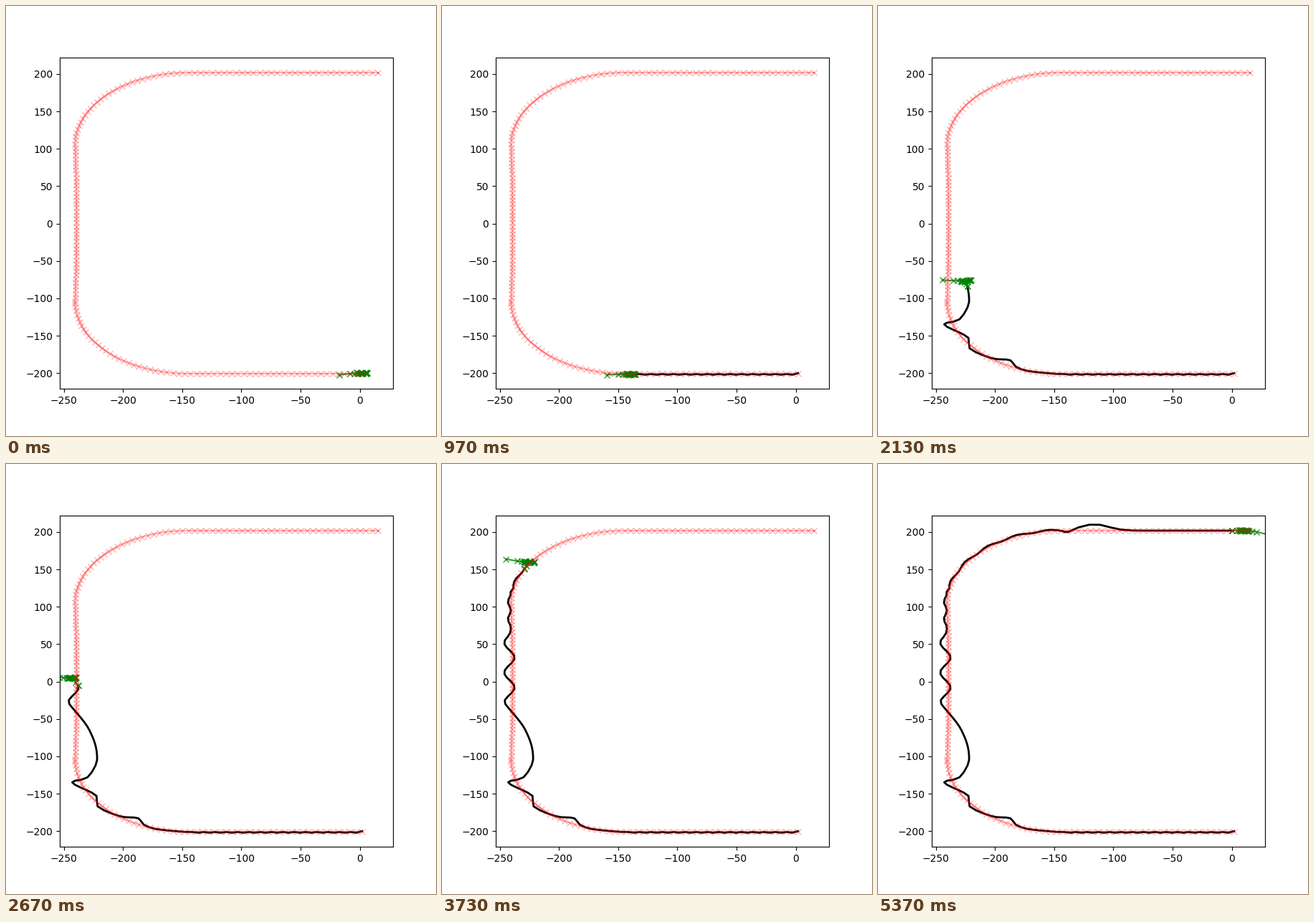
Animation, 600 px wide and 600 px high, one loop 5.41 s. Source, as a matplotlib script:

```python
import numpy as np
import matplotlib.pyplot as plt
from matplotlib.animation import FuncAnimation

FRAMES, LOOP_MS = 163, 5410
LAST = 161                      # final driving step, held to the end
CX, CY, RX, RY = -145, 105.5, 95.6, 96.3
LOW, HIGH = -200.8, 201.8


def course(step=5):
    """C-shaped course, resampled at even distances."""
    t = np.linspace(0, 1, 400)
    side = CY * (2 * t - 1)
    quarter = t * np.pi / 2
    x = np.concatenate([2 + (CX - 2) * t, CX - RX * np.sin(quarter),
                        -239.4 - 1.2 * (side / CY) ** 2,
                        CX - RX * np.cos(quarter), CX + (15.35 - CX) * t])
    y = np.concatenate([np.full(400, LOW), -CY - RY * np.cos(quarter) + 1,
                        side, CY + RY * np.sin(quarter), np.full(400, HIGH)])
    dist = np.append(0, np.cumsum(np.hypot(np.diff(x), np.diff(y))))
    even = np.linspace(0, dist[-1], round(dist[-1] / step) + 1)
    return np.interp(even, dist, x), np.interp(even, dist, y)


def smooth(t, keys):
    """Hermite curve through (time, x, y) keys."""
    k = np.array(keys, float)
    time, pos = k[:, 0], k[:, 1:]
    slope = np.empty_like(pos)
    slope[1:-1] = (pos[2:] - pos[:-2]) / (time[2:] - time[:-2])[:, None]
    slope[0] = (pos[1] - pos[0]) / (time[1] - time[0])
    slope[-1] = (pos[-1] - pos[-2]) / (time[-1] - time[-2])
    i = np.clip(np.searchsorted(time, t, side='right') - 1, 0, len(k) - 2)
    span = (time[i + 1] - time[i])[:, None]
    u = (t - time[i])[:, None] / span
    return (pos[i] * (1 + 2 * u) * (1 - u) ** 2
            + pos[i + 1] * u ** 2 * (3 - 2 * u)
            + slope[i] * span * u * (1 - u) ** 2
            + slope[i + 1] * span * u ** 2 * (u - 1))


def bell(x, mid, width):
    return np.exp(-((x - mid) / width) ** 2)


def straight(n):
    y = -201.7 + 0.5 * (-1.0) ** n + 1.1 * (n == 0)
    return np.column_stack([2 - 4.78 * n, y])


def detour(n):
    return smooth(n, [
        (30, -143, -201.8), (36, -173, -197), (38, -182.5, -191.5),
        (40, -187, -183), (44, -203, -180), (47, -221.5, -167),
        (49, -222.5, -153), (54, -243, -134.8), (57, -230, -128),
        (60, -222, -105), (68, -228.5, -65), (75, -245.5, -30)])


def weave(n):
    y = 5.0 * n - 405
    phase = np.pi * np.interp(y, [-28, 72, 125], [0, 5, 9.6])
    return np.column_stack([-242 - np.where(y < 62, 4.4, 1.3) * np.cos(phase), y])


def bend(n):
    a = 0.2 + 0.049 * (n - 106)
    r = 1.005 + 0.01 * np.cos(n * np.pi / 3)
    return np.column_stack([CX - RX * r * np.cos(a), CY + RY * r * np.sin(a)])


def finish(n):
    x = np.interp(n, [134, 137, 143, 165], [-145.8, -138.5, -84, 19.3])
    y = HIGH + 8.5 * bell(x, -116, 16.5) - 3.3 * bell(x, -139, 4)
    return np.column_stack([x, y])


steps = np.arange(166)
bounds = [0, 31, 76, 106, 134, 166]
legs = [straight, detour, weave, bend, finish]
path = np.concatenate([leg(steps[a:b])
                       for leg, a, b in zip(legs, bounds, bounds[1:])])


def at(t):
    return np.array([np.interp(t, steps, path[:, i]) for i in (0, 1)])


def prediction(n):
    """Planned points: the vehicle, a dithering cluster, then a stray tail."""
    rng = np.random.default_rng(n)
    head, mid = path[n], at(n + 2 * min(1, n / 80))
    link = head + 0.4 * (mid - head)
    spread = 1 - 0.92 * np.exp(-((n - 138) / 4) ** 4)
    side = (-1.0) ** np.arange(18)
    cluster = mid + spread * np.column_stack(
        [side * rng.uniform(0.5, 4.8, 18), rng.uniform(-1.2, 1.2, 18)])
    reach = np.array([6.5, 10, 19.5])
    curl = (reach / 20) ** 2
    if n < 128:
        tail = mid + np.column_stack([-reach, (-2.5 + 6.5 * n / 112) * curl])
    else:
        tail = np.column_stack([mid[0] + 1.1 * reach, HIGH - 6 * curl])
    return np.concatenate([[head, head, link], cluster, tail])


fig, ax = plt.subplots(figsize=(6, 6), dpi=100)
ax.set_xlim(-253.55, 28.15)
ax.set_ylim(-220.9, 221.9)

ax.plot(15.35, HIGH, '.', color='midnightblue', ms=2, mew=0)
trail, = ax.plot([], [], 'k-', lw=2)
plan, = ax.plot([], [], 'gx-', lw=1.5, alpha=0.8)
ax.plot(*course(), 'rx-', lw=1.5, alpha=0.3)


def update(frame):
    n = min(frame, LAST)
    trail.set_data(*path[:n + 1].T)
    plan.set_data(*prediction(n).T)
    return trail, plan


anim = FuncAnimation(fig, update, frames=FRAMES, interval=LOOP_MS / FRAMES,
                     repeat=True, repeat_delay=0, cache_frame_data=False)
plt.show()
```
